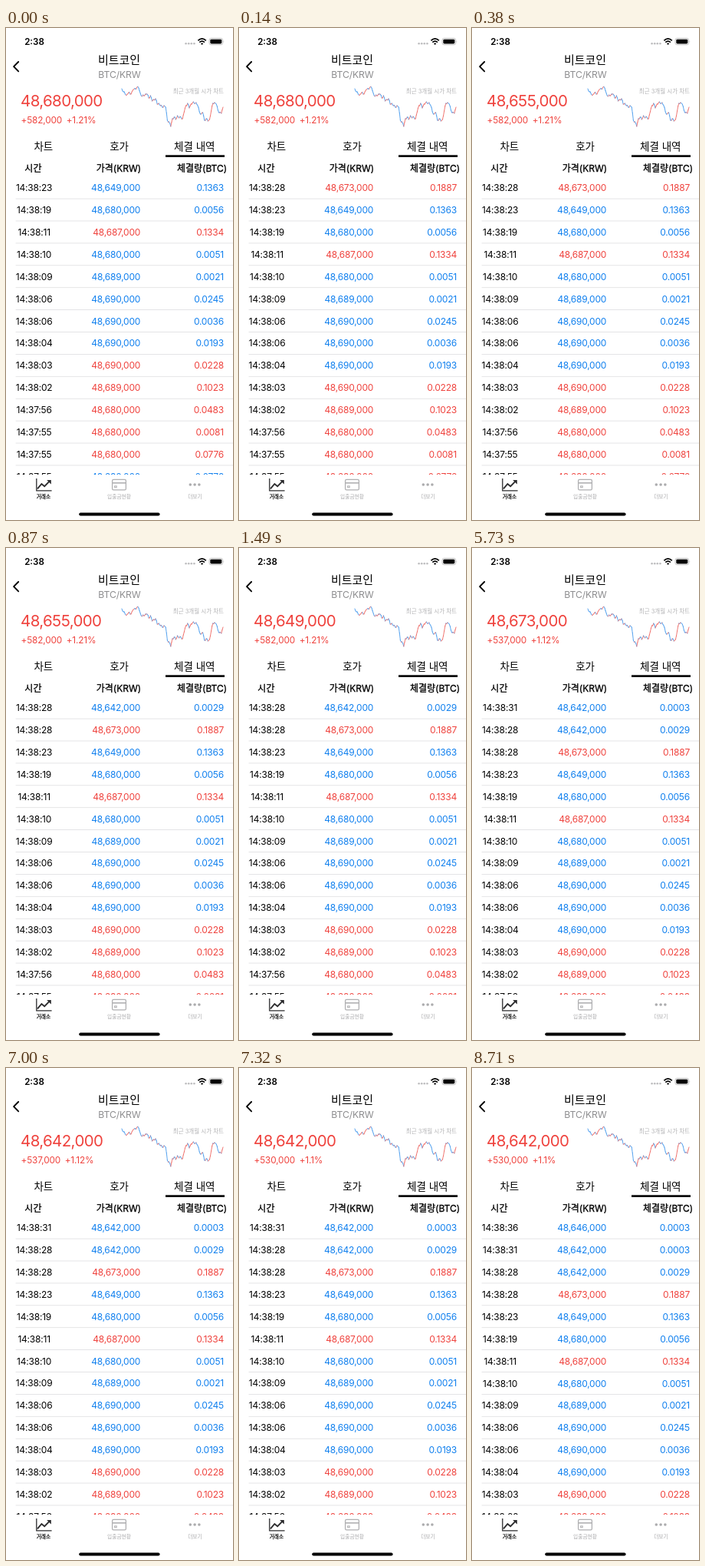
An HTML page that plays this animation: 296 by 640 pixels, repeating every 8810 ms.

```html
<!DOCTYPE html>
<html lang="ko">
<head>
<meta charset="utf-8">
<title>체결 내역</title>
<style>
html, body { margin: 0; width: 100%; height: 100%; overflow: hidden; background: #fff; }
svg { display: block; }
#stage { width: 100vw; height: 100vh; }
text {
  font-family: Inter, "Noto Sans CJK KR", "Noto Sans CJK", sans-serif;
  font-optical-sizing: none;
  white-space: pre;
}
.mid { text-anchor: middle; }
.end { text-anchor: end; }
.row { font-size: 12px; letter-spacing: -.018em; }
.up { fill: #ef423d; }
.down { fill: #0f7fee; }
.tab { font-size: 13.5px; }
.head { font-size: 12px; stroke: #000; stroke-width: .3px; }
.foot { font-size: 6.7px; fill: #a9a9ab; }
.line { fill: none; }
</style>
</head>
<body>
<svg id="stage" viewBox="0 0 296 640">
  <rect width="296" height="640" fill="#fff"/>

  <!-- status bar -->
  <text class="mid" x="37" y="21.8" font-size="11.6" font-weight="600">2:38</text>
  <g fill="#bdbdbf">
    <circle cx="234.6" cy="20.2" r="1.3"/><circle cx="238.2" cy="20.2" r="1.3"/>
    <circle cx="241.8" cy="20.2" r="1.3"/><circle cx="245.4" cy="20.2" r="1.3"/>
  </g>
  <g class="line" stroke="#000" stroke-width="1.7">
    <path d="M250.4 16.4Q255.6 11.4 260.8 16.4"/>
    <path d="M252.3 18.6Q255.6 15.5 258.9 18.6"/>
  </g>
  <path d="M253.9 20.1Q255.6 18.8 257.3 20.1L255.6 21.9Z"/>
  <rect x="265" y="13.4" width="17.6" height="8.4" rx="2.4" fill="none" stroke="#b4b4b4" stroke-width=".8"/>
  <rect x="266.3" y="14.7" width="15" height="5.8" rx="1.4"/>
  <path d="M283.6 16.2q1.3 1.4 0 2.8z" fill="#b4b4b4"/>

  <!-- title -->
  <path class="line" d="M16.2 44L10.1 50.2L16.2 56.4" stroke="#000" stroke-width="1.9" stroke-linecap="round" stroke-linejoin="round"/>
  <text class="mid" x="147.5" y="46.9" font-size="15">비트코인</text>
  <text class="mid" x="148" y="64.8" font-size="12.2" letter-spacing="-.01em" fill="#8e8e90">BTC/KRW</text>

  <!-- price summary -->
  <text id="price" class="up" x="19" y="102.3" font-size="20.5" letter-spacing="-.03em"></text>
  <text class="up" x="19.5" y="124" font-size="11.8" letter-spacing="-.012em"><tspan id="diff"></tspan><tspan id="rate" dx="5.6"></tspan></text>
  <g id="spark" class="line" stroke-width=".85" stroke-linecap="round"></g>
  <text class="end" x="284" y="84.6" font-size="7.5" fill="#b2b2b4">최근 3개월 시가 차트</text>

  <!-- tabs -->
  <text class="tab mid" x="48.8" y="159">차트</text>
  <text class="tab mid" x="147.6" y="159">호가</text>
  <text class="tab mid" x="245.8" y="159">체결 내역</text>
  <rect x="208" y="165.3" width="77" height="2.6"/>

  <!-- trades -->
  <text class="head mid" x="35.4" y="187.2">시간</text>
  <text class="head mid" x="147" y="187.2">가격(KRW)</text>
  <text class="head mid" x="255.5" y="187.2">체결량(BTC)</text>
  <svg y="194" width="296" height="387" overflow="hidden"><g id="rows"></g></svg>

  <!-- bottom bar -->
  <g class="line" stroke="#2c2c2e">
    <path d="M39.8 586V601.8H59.6" stroke-width="1.3"/>
    <path d="M41 599.4L46.4 593L50.2 596.2L56.4 589.8" stroke-width="1.9"/>
  </g>
  <path d="M53.2 588H58.8V593.6Z" fill="#2c2c2e"/>
  <text class="foot mid" x="48.9" y="612" style="fill:#000;stroke:#000;stroke-width:.2px">거래소</text>
  <g class="line" stroke="#b0b0b2" stroke-width="1.3">
    <rect x="138.6" y="587.4" width="17.8" height="13.4" rx="1.6"/>
    <path d="M138.6 591.8H156.4" stroke-width="1.6"/>
    <rect x="141.6" y="595.8" width="2.6" height="1.8" stroke-width="1"/>
  </g>
  <text class="foot mid" x="147.5" y="612">입출금현황</text>
  <g fill="#acacae">
    <circle cx="240.3" cy="594" r="1.8"/><circle cx="246.1" cy="594" r="1.8"/><circle cx="251.9" cy="594" r="1.8"/>
  </g>
  <text class="foot mid" x="246.4" y="612">더보기</text>
  <rect x="95.2" y="630.6" width="105.4" height="3.9" rx="1.95"/>
</svg>

<script>
const LOOP = 8810, PITCH = 28.9;
const $ = id => document.getElementById(id);

function add(parent, tag, attrs, text = '') {
  const el = document.createElementNS('http://www.w3.org/2000/svg', tag);
  for (const key in attrs) el.setAttribute(key, attrs[key]);
  el.textContent = text;
  parent.append(el);
}

// Newest first: time, price in thousands, amount, direction
const trades = `
14:38:36 646 0003 down
14:38:31 642 0003 down
14:38:28 642 0029 down
14:38:28 673 1887 up
14:38:23 649 1363 down
14:38:19 680 0056 down
14:38:11 687 1334 up
14:38:10 680 0051 down
14:38:09 689 0021 down
14:38:06 690 0245 down
14:38:06 690 0036 down
14:38:04 690 0193 down
14:38:03 690 0228 up
14:38:02 689 1023 up
14:37:56 680 0483 up
14:37:55 680 0081 up
14:37:55 680 0776 up
14:37:55 680 0772 down`.trim().split('\n').map(line => line.split(' '));

const won = thousands => `48,${thousands},000`;

trades.forEach(([time, price, amount, dir], i) => {
  const y = i * PITCH + 18.2;
  add($('rows'), 'text', { class: 'row mid', x: 36.6, y }, time);
  add($('rows'), 'text', { class: `row end ${dir}`, x: 175.2, y }, won(price));
  add($('rows'), 'text', { class: `row end ${dir}`, x: 284, y }, '0.' + amount);
  add($('rows'), 'rect', { x: 12.6, y: (i + 1) * PITCH - 1.2, width: 283.4, height: .8, fill: '#dedee0' });
});

// Sparkline heights at an even step, with a small wiggle between them
const heights = [79, 83, 86, 87, 84, 86, 83, 80, 79, 77, 78, 85, 89, 88, 86, 86, 91, 88, 95, 93, 92,
  99, 98, 101, 103, 101, 103, 120, 122, 128, 118, 116, 119, 114, 117, 116, 118, 109, 101, 98, 104,
  99, 97, 98, 97, 101, 109, 112, 110, 120, 118, 121, 119, 108, 98, 97, 99, 107, 110, 111, 103];
const spark = heights.flatMap((y, i) => i ? [(heights[i - 1] + y) / 2 + 1.4 * Math.sin(i * 2.3), y] : [y]);
const sparkX = i => 151 + i * 1.1;
spark.slice(1).forEach((y, i) => add($('spark'), 'path', {
  d: `M${sparkX(i)} ${spark[i]}L${sparkX(i + 1)} ${y}`,
  stroke: y > spark[i] ? '#3d95ec' : '#ec605b'
}));

// Each track is a list of [start ms, value]
const tracks = {
  first: [[0, 4], [140, 3], [870, 2], [3620, 1], [8710, 0]],
  price: [[0, 680], [380, 655], [1490, 649], [5730, 673], [7000, 642]],
  change: [[0, ['+582,000', '+1.21%']], [5730, ['+537,000', '+1.12%']], [7320, ['+530,000', '+1.1%']]]
};
const at = (track, t) => track.filter(([start]) => start <= t).pop()[1];

function put(id, text) {
  if ($(id).textContent !== text) $(id).textContent = text;
}

function draw(t) {
  const [diff, rate] = at(tracks.change, t);
  put('price', won(at(tracks.price, t)));
  put('diff', diff);
  put('rate', rate);
  $('rows').setAttribute('transform', `translate(0 ${-at(tracks.first, t) * PITCH})`);
}

const begin = performance.now();
function tick() {
  draw((performance.now() - begin) % LOOP);
  requestAnimationFrame(tick);
}
tick();
</script>
</body>
</html>
```
